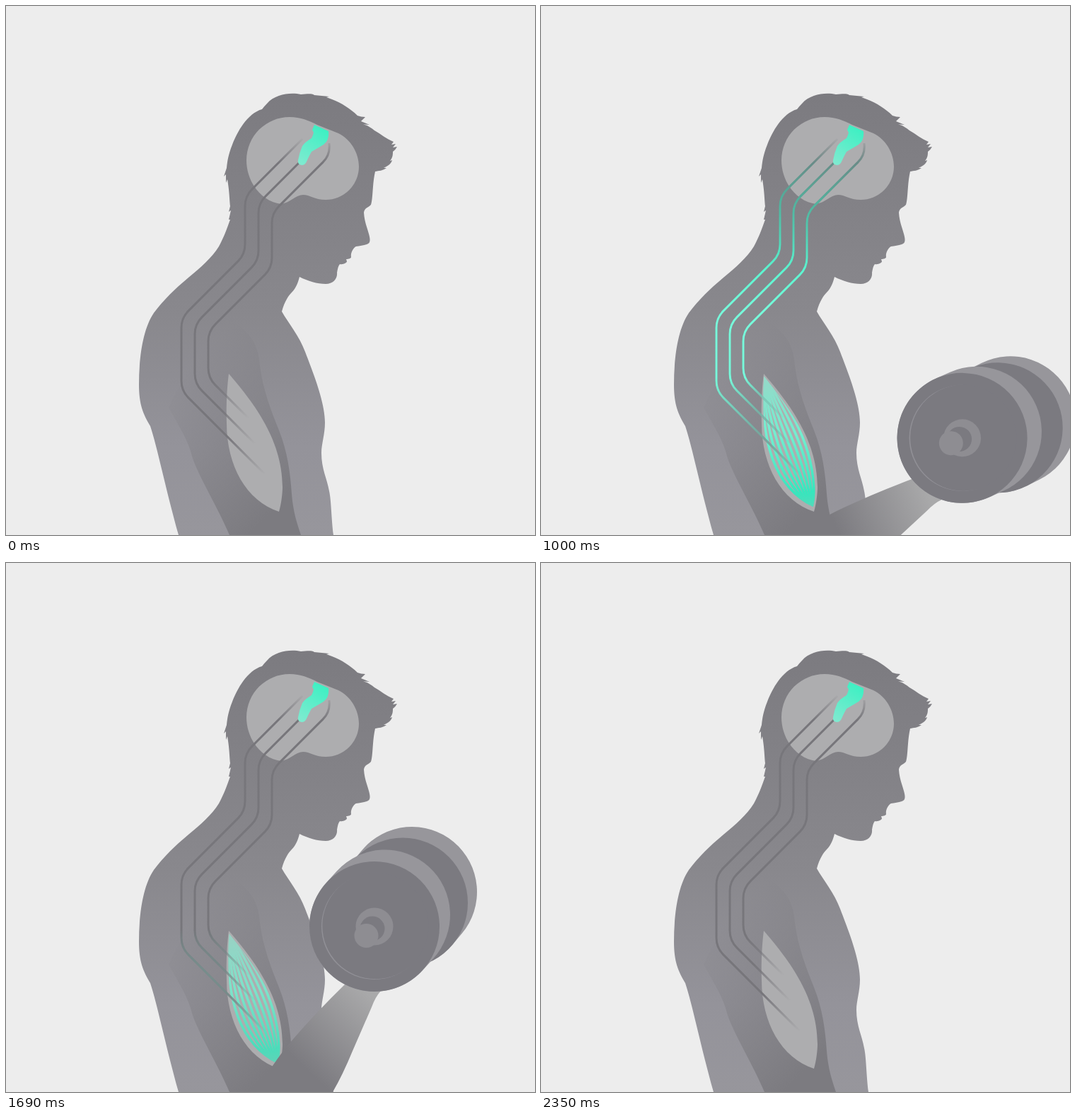
Write an HTML page that moves like this. It is 748x748 px and loops after 2.72 s.

```html
<!DOCTYPE html>
<html lang="en">
<head>
<meta charset="utf-8">
<title>Biceps curl</title>
<style>
  html, body { margin: 0; width: 100%; height: 100%; overflow: hidden; background: #ededed; }
  svg { display: block; width: 100vw; height: 100vh; }
</style>
</head>
<body>
<svg viewBox="0 0 748 748">
  <defs>
    <linearGradient id="skin" gradientUnits="userSpaceOnUse" x1="0" y1="124" x2="0" y2="748">
      <stop offset="0" stop-color="#7c7b80"/>
      <stop offset=".5" stop-color="#89888d"/>
      <stop offset=".8" stop-color="#94939a"/>
      <stop offset="1" stop-color="#97969c"/>
    </linearGradient>
    <linearGradient id="shade" gradientUnits="userSpaceOnUse" x1="238" y1="530" x2="400" y2="690">
      <stop offset="0" stop-color="#7c7b80" stop-opacity="0"/>
      <stop offset="1" stop-color="#7c7b80"/>
    </linearGradient>
    <linearGradient id="motor" gradientUnits="userSpaceOnUse" x1="448" y1="172" x2="416" y2="224">
      <stop offset="0" stop-color="#3df0c3"/>
      <stop offset="1" stop-color="#80ead0"/>
    </linearGradient>
    <linearGradient id="fiber" gradientUnits="userSpaceOnUse" x1="0" y1="525" x2="0" y2="705">
      <stop offset="0" stop-color="#96d8c8"/>
      <stop offset=".45" stop-color="#72efd0"/>
      <stop offset=".9" stop-color="#36e6bd"/>
      <stop offset="1" stop-color="#4fdcbb"/>
    </linearGradient>
    <linearGradient id="forearmFill" gradientUnits="userSpaceOnUse" x1="413" y1="705" x2="508" y2="604">
      <stop offset="0" stop-color="#7c7b80"/>
      <stop offset="1" stop-color="#a9a9aa"/>
    </linearGradient>
    <linearGradient id="pulse" x1="0" y1="0" x2="0" y2="1">
      <stop offset="0" stop-color="#fff" stop-opacity="0"/>
      <stop offset=".28" stop-color="#fff"/>
      <stop offset=".845" stop-color="#fff"/>
      <stop offset="1" stop-color="#fff" stop-opacity="0"/>
    </linearGradient>
    <mask id="pulseMask" maskUnits="userSpaceOnUse" x="0" y="0" width="748" height="748">
      <g id="pulses" fill="url(#pulse)">
        <rect y="-756" width="748" height="712"/>
        <rect y="-1725" width="748" height="712"/>
        <rect y="-2694" width="748" height="712"/>
      </g>
    </mask>
    <clipPath id="inMuscle">
      <path d="M315.500 524C344 560 388 612 388 680C388 690 387 702 384 711C342 696 315 648 315 590C314 562 314 540 315.500 524Z"/>
    </clipPath>
  </defs>

  <path fill="url(#skin)" d="M317 302C312 316 308 327 301 340C291 356 275 370 258 384
    C241 398 224 414 209 434C194 456 188 495 188 535C188 564 194 577 204 594
    C214 624 225 680 244 748H463C460 725 460 699 457 686C454 668 446 655 446 632
    C446 619 451 606 451 589C451 560 434 518 423 489C415 467 399 448 390 432
    C394 417 400 409 404 405C410 399 413 391 415 383C427 389 440 393 452 393
    C463 393 469 385 468 377C469 371 470 367 472 365C477 366 482 363 482 361
    L481 358C484 358 488 357 488 355C487 349 491 342 495 340C502 339 512 338 514 334
    C517 326 507 311 506 292C507 285 513 285 516 281C519 272 518 251 522 234
    C527 233 533 233 538 229L534 229C541 226 545 222 546 218L543 219C547 214 547 210 547 206
    Q551 203 553 199L547 200L551 195L545 196L548 192C538 188 530 181 521 176
    C516 172 511 169 505 167Q510 168 514 168L502 163Q505 160 508 157Q502 157 497 155
    C487 145 474 137 461 132L453 129L457 128L436 126C431 123 424 125 417 125
    C403 122 381 124 369 138Q365 142 362 146C341 152 327 178 320 196C314 211 313 220 312 229
    L308 241L311 238L311 250L313 245C316 262 316 276 317 283L315 291L318 289L315 302Z"/>
  <path fill="url(#shade)" d="M316 445C340 455 355 475 358 500C362 540 374 570 386 600
    C398 630 402 660 404 690C406 715 411 730 417 748H316C300 710 275 670 264 640
    C258 615 248 600 230 568C250 520 290 470 316 445Z"/>

  <path fill="#adadaf" d="M340 218A61 61 0 0 1 401 157C417 157 428 162 440 168L470 180
    C488 189 499 208 499 227A47 47 0 0 1 452 274C436 274 430 267 420 267
    C410 267 402 278 389 280C360 276 340 248 340 218Z"/>
  <path fill="#adadaf" d="M315 520C345 555 391 610 391 680C391 690 389 705 386 715
    C340 700 312 650 312 590C311 560 313 535 315 520Z"/>
  <g id="fibers" fill="none" stroke="url(#fiber)" stroke-width="3.600" clip-path="url(#inMuscle)"/>
  <g id="nerves" fill="none" stroke-width="3"/>
  <g id="signal" fill="none" stroke-width="3" mask="url(#pulseMask)"/>
  <path fill="url(#motor)" d="M436 168L456 177Q457 186 453 192Q450 196 444 199L432 206
    Q428 213 425 220Q423 225 418 225Q412 224 413 218Q415 207 419 198Q422 193 432 187
    Q434 183 435 179L433 175Z"/>

  <g id="arm">
    <path id="forearm" fill="url(#forearmFill)" d="M352 746L377 711Q391 690 407 672Q438 636 478 597
      L500 575L545 585L530 605Q522 614 517 628L490 690Q476 724 462 748L448 775H352Z"/>
    <g stroke-width="184" stroke-linecap="round">
      <path stroke="#97969b" d="M561 480.500L574 465"/>
      <path stroke="#7b7a80" d="M561 480.500h.01"/>
      <path stroke="#97969b" d="M521 514L536 497.500"/>
      <path stroke="#7b7a80" d="M521 514h.01"/>
    </g>
    <circle cx="521" cy="514" r="75" fill="#919096"/>
    <circle cx="522.500" cy="513" r="75.200" fill="#7b7a80"/>
    <circle cx="521" cy="514" r="26.500" fill="#8e8d92"/>
    <circle cx="518" cy="517" r="17.500" fill="#7b7a80"/>
    <circle cx="509.500" cy="527" r="17" fill="#8e8d92"/>
  </g>
</svg>
<script>
  const LOOP = 2720, START = 130, END = 2350, STEP = 30;
  const $ = id => document.getElementById(id);
  const clamp = v => Math.min(1, Math.max(0, v));

  // Corner points of each nerve, from brain to muscle.
  const nerves = [
    [[419, 188], [338, 269], [338, 351], [248, 441], [248, 544], [366, 662]],
    [[420, 216], [357, 279], [357, 360], [267, 450], [267, 534], [352, 619]],
    [[457, 194], [458, 211], [376, 293], [376, 370], [286, 460], [286, 526], [343, 583]]
  ];

  function roundedPath(points, radius) {
    const toward = ([x, y], [u, v]) => {
      const k = radius / Math.hypot(u - x, v - y);
      return [x + (u - x) * k, y + (v - y) * k];
    };
    const bends = points.slice(1, -1).map((p, i) =>
      `L${toward(p, points[i])}Q${p} ${toward(p, points[i + 2])}`);
    return `M${points[0]}${bends.join('')}L${points.at(-1)}`;
  }

  function addNerve(layer, name, d, end, stops) {
    const top = 185;
    const marks = stops.map(([y, color, alpha]) =>
      `<stop offset="${(y - top) / (end - top)}" stop-color="${color}" stop-opacity="${alpha}"/>`).join('');
    layer.innerHTML += `<linearGradient id="${name}" gradientUnits="userSpaceOnUse" x1="0" y1="${top}" x2="0" y2="${end}">${marks}</linearGradient>
      <path d="${d}" stroke="url(#${name})"/>`;
  }

  nerves.forEach((points, i) => {
    const gray = '#77767b', mint = '#78fadb';
    const d = roundedPath(points, 14), end = points.at(-1)[1];
    addNerve($('nerves'), 'gray' + i, d, end,
      [[185, gray, 0], [222, gray, 1], [end - 52, gray, 1], [end, gray, 0]]);
    addNerve($('signal'), 'mint' + i, d, end,
      [[185, '#2be8bb', 0], [225, '#2be8bb', .9], [270, '#2fe9bd', 1], [430, mint, 1],
       [525, mint, 1], [(525 + end) / 2, mint, .45], [end, mint, 0]]);
  });

  // Fibers fan out between the two edges of the muscle.
  const COUNT = 8;
  for (let i = 0; i < COUNT; i++) {
    const u = i / (COUNT - 1), mix = (a, b) => a + (b - a) * u;
    $('fibers').innerHTML += `<path d="M${mix(315, 317)} 523C${mix(311, 346)} ${mix(600, 560)} ` +
      `${mix(322, 393)} ${mix(669, 625)} ${mix(376, 385)} ${mix(702, 708)}"/>`;
  }

  // Degrees the forearm is lowered from the top of the curl.
  function armAngle(t) {
    if (t < 1330) return Math.min(95, 69 * ((1330 - t) / 840) ** 1.142);
    return Math.min(95, 26 * (Math.max(0, t - 1690) / 300) ** 1.4);
  }

  function draw(now) {
    let t = now % LOOP;
    t = t < START ? 0 : Math.min(END, START + STEP * Math.floor((t - START) / STEP));

    const a = armAngle(t), drift = a * (a - 25) / 3036;
    $('arm').setAttribute('transform',
      `translate(${54 * drift} ${-16 * drift}) rotate(${a} 328.5 741)`);
    $('arm').style.visibility = a < 85 ? 'visible' : 'hidden';
    $('forearm').style.display = a < 52 ? '' : 'none';

    $('pulses').setAttribute('transform', `translate(0 ${1.9 * t})`);
    $('fibers').style.opacity = Math.min(clamp((t - 400) / 400), clamp((1980 - t) / 350));
  }

  const begin = performance.now();
  function tick() {
    draw(performance.now() - begin);
    requestAnimationFrame(tick);
  }
  tick();
</script>
</body>
</html>
```
